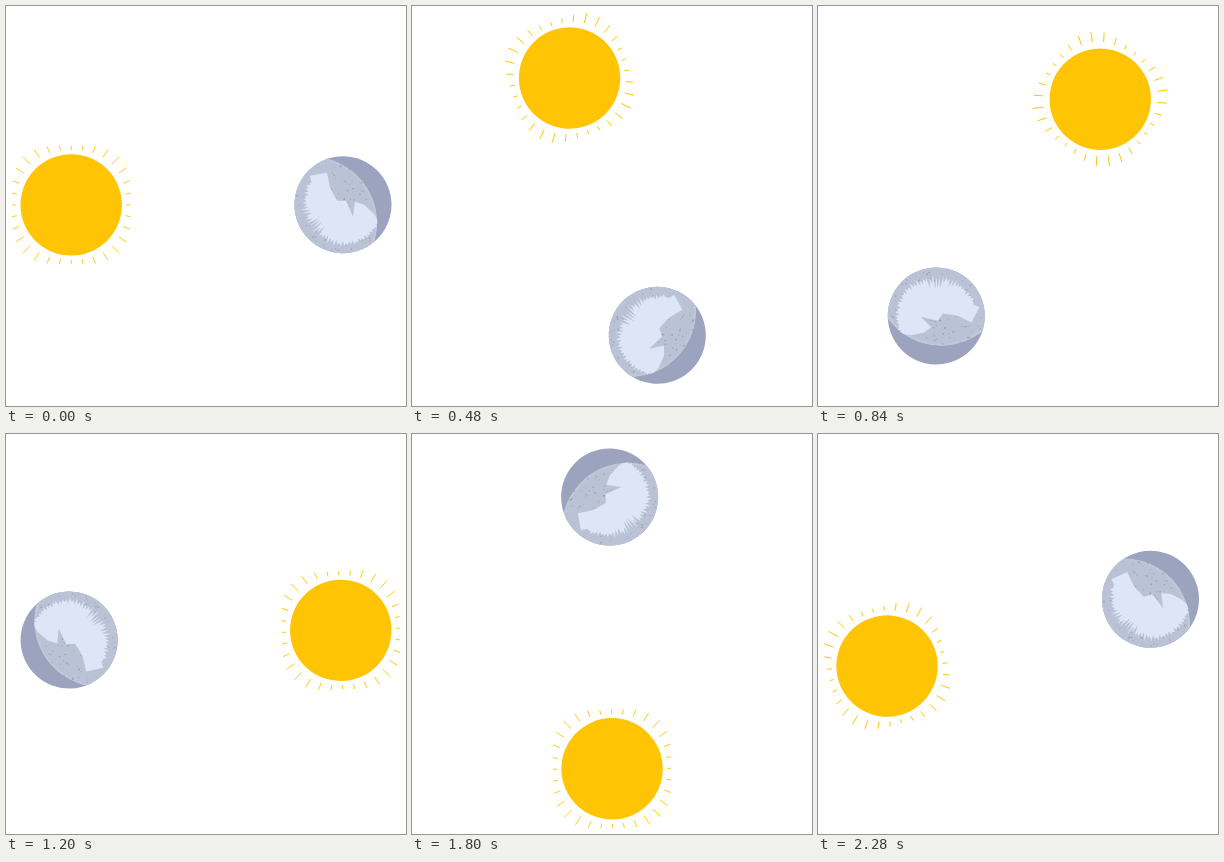
Write an HTML page with a canvas that moves like this. It is 400 px wide and 400 px high and loops after 2320 ms.

```html
<!DOCTYPE html>
<html lang="en">
<head>
<meta charset="utf-8">
<title>Sun and moon</title>
<style>
  html, body { margin: 0; width: 100%; height: 100%; overflow: hidden; background: #fff; }
  canvas { display: block; width: 400px; height: 400px; }
</style>
</head>
<body>
<canvas id="stage" width="400" height="400"></canvas>
<script>
const ctx = document.getElementById('stage').getContext('2d');
const TAU = Math.PI * 2, RAD = Math.PI / 180;
const LOOP = 2320, TICK = 40, STEP = 5.085 * RAD;
const SUN_R = 50.7, MOON_R = 48.5, RAYS = 32;
const YELLOW = '#ffc403', DARK = '#9ca3be', RIM = '#bfc7d9',
      MID = '#bac3d5', SPOT = '#9ba5b9', LIGHT = '#dee5f7';

let seed = 11;
function rand() {
  seed = (seed * 16807) % 2147483647;
  return seed / 2147483647;
}

function polar(r, a) {
  return [r * Math.cos(a), r * Math.sin(a)];
}

function disc(x, y, r) {
  const p = new Path2D();
  p.arc(x, y, r, 0, TAU);
  return p;
}

// Short on the axes, longest on the diagonals
function sunRays() {
  const p = new Path2D();
  for (let i = 0; i < RAYS; i++) {
    const a = i / RAYS * TAU, extra = Math.sin(2 * a) ** 2;
    p.moveTo(...polar(55 + 2.5 * extra, a));
    p.lineTo(...polar(59 + 9 * extra, a));
  }
  return p;
}

// Feathered outer edge, deepest at the lower left, closed by a smooth shore
function brightPlain() {
  const p = new Path2D();
  for (let deg = 28; deg < 216; deg += 5) {
    const depth = 5 + 11 * Math.exp(-(((deg - 140) / 28) ** 2));
    p.lineTo(...polar(42 - 3 * rand(), deg * RAD));
    p.lineTo(...polar(41 - depth * (0.4 + 0.6 * rand()), (deg + 2.5) * RAD));
  }
  const shore = [[-33, -29], [-16, -32], [-13, -17], [-6, -4], [3, -4],
                 [10, 12], [12, -3], [21, 0], [31, 9]];
  shore.forEach(point => p.lineTo(...point));
  p.closePath();
  return p;
}

function craters(count) {
  const p = new Path2D();
  for (let i = 0; i < count; i++) {
    const [x, y] = polar(47 * Math.sqrt(rand()), rand() * TAU);
    p.addPath(disc(x, y, 0.5 + rand() * 0.5));
  }
  return p;
}

const sun = disc(0, 0, SUN_R), rays = sunRays();
const moon = disc(0, 0, MOON_R), lit = disc(-32, 18, 66.3), inner = disc(-32, 18, 64);
const plain = brightPlain(), spots = craters(140);

function fill(path, color) {
  ctx.fillStyle = color;
  ctx.fill(path);
}

function drawSun() {
  fill(sun, YELLOW);
  ctx.strokeStyle = YELLOW;
  ctx.lineWidth = 0.9;
  ctx.stroke(rays);
}

function drawMoon() {
  fill(moon, DARK);
  ctx.clip(moon);
  ctx.clip(lit);
  fill(lit, RIM);
  fill(inner, MID);
  fill(spots, SPOT);
  fill(plain, LIGHT);
}

function place(x, y, draw) {
  ctx.save();
  ctx.translate(x, y);
  draw();
  ctx.restore();
}

function frame() {
  // Thirty poses a second shown at twenty-five: every fifth tick skips one
  const tick = Math.floor((performance.now() % LOOP) / TICK);
  const pose = Math.max(0, Math.ceil(tick * 1.2 - 1e-6) - 1);
  ctx.fillStyle = '#fff';
  ctx.fillRect(0, 0, 400, 400);
  ctx.save();
  ctx.translate(200, 200);
  ctx.rotate(pose * STEP);
  place(-134.8, -1.1, drawSun);
  place(137, -1.2, drawMoon);
  ctx.restore();
  requestAnimationFrame(frame);
}
frame();
</script>
</body>
</html>
```
